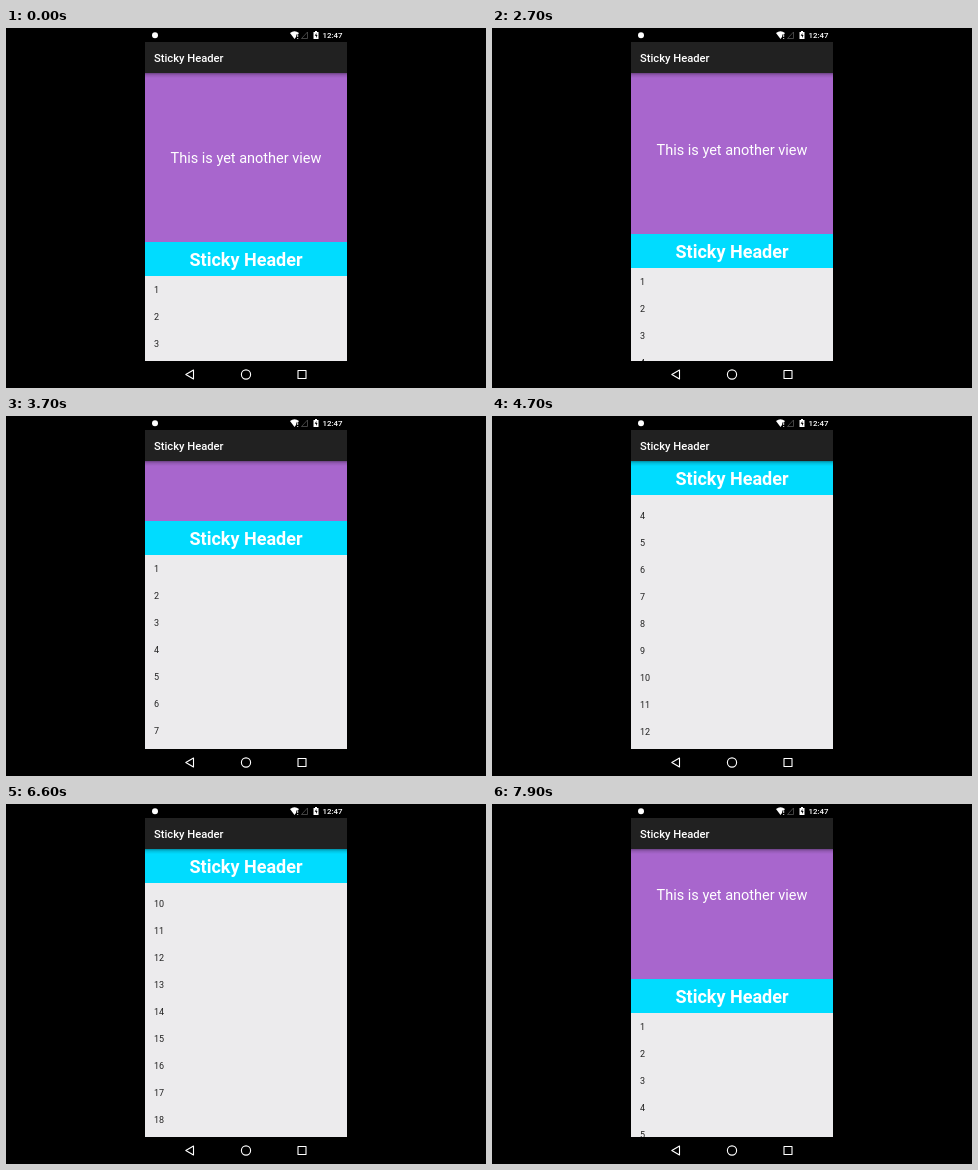
Animation, 480 px wide and 360 px high, one loop 8000 ms. Source, as an HTML page:

```html
<!DOCTYPE html>
<html lang="en">
<head>
<meta charset="utf-8">
<title>Sticky header</title>
<style>
  html, body { margin: 0; width: 100%; height: 100%; overflow: hidden; background: #000; }
  svg { display: block; width: 480px; height: 360px; font-family: Roboto, sans-serif; }
  .mid { text-anchor: middle; fill: #fff; }
  .row { font-size: 9px; fill: #212121; }
</style>
</head>
<body>
<svg viewBox="0 0 480 360">
  <defs>
    <clipPath id="screen"><rect x="139" y="45" width="202" height="288"/></clipPath>
    <linearGradient id="shade" x1="0" y1="0" x2="0" y2="1">
      <stop offset="0" stop-color="#000" stop-opacity=".36"/>
      <stop offset=".4" stop-color="#000" stop-opacity=".13"/>
      <stop offset="1" stop-color="#000" stop-opacity="0"/>
    </linearGradient>
  </defs>
  <rect width="480" height="360"/>

  <g clip-path="url(#screen)">
    <rect x="139" y="45" width="202" height="288" fill="#ecebed"/>
    <g id="content">
      <rect x="139" y="45" width="202" height="169" fill="#a866cd"/>
      <text class="mid" x="240" y="135.3" font-size="14.5">This is yet another view</text>
      <g id="rows"></g>
    </g>
    <g id="header">
      <rect x="139" width="202" height="34" fill="#00dcff"/>
      <text class="mid" x="240" y="24" font-size="18" font-weight="700">Sticky Header</text>
    </g>
    <rect x="139" y="45" width="202" height="5" fill="url(#shade)"/>
  </g>

  <rect x="139" y="14" width="202" height="31" fill="#212121"/>
  <text x="148" y="34" font-size="11.2" font-weight="500" fill="#fff">Sticky Header</text>

  <!-- status bar -->
  <g fill="#fff">
    <circle cx="149" cy="7.2" r="3"/>
    <path d="M284 5Q288.500 1.500 293 5L288.500 11Z"/>
    <path d="M291.500 6.500V9M291.500 10V11" stroke="#000" stroke-width="2.400"/>
    <path d="M291.700 6.500V9M291.700 10V11" stroke="#fff" stroke-width=".9"/>
    <path d="M295.500 10.500L301.500 4V10.500Z" fill="none" stroke="#555" stroke-width=".8"/>
    <path d="M307.500 4H309V3H311V4H312.500V11H307.500Z"/>
    <path d="M310.400 5L308.700 7.800H310V10L311.500 7H310.400Z" fill="#000"/>
    <text x="316.500" y="10" font-size="7.9" font-weight="500">12:47</text>
  </g>

  <!-- navigation bar -->
  <g fill="none" stroke="#fff" stroke-width="1.100" stroke-linejoin="round">
    <path d="M179.800 346.500L187.500 342V351Z"/>
    <circle cx="240" cy="346.500" r="4.600"/>
    <rect x="292" y="342.500" width="8" height="8"/>
  </g>
</svg>
<script>
  const LOOP = 8000, STEP = 100, ROW = 27, STUCK = 45, REST = 214;
  const byId = id => document.getElementById(id);
  const content = byId('content'), header = byId('header');

  // time in ms, scroll in px, speed in px per second
  const keys = [
    [2600, 0, 0], [2700, 8, 90], [3700, 109, 115], [4700, 243, 200],
    [5900, 567, 0], [7300, 161, -235], [7900, 39, -180]
  ];

  for (let n = 1; n <= 30; n++) {
    const row = document.createElementNS('http://www.w3.org/2000/svg', 'text');
    row.setAttribute('class', 'row');
    row.setAttribute('x', 148);
    row.setAttribute('y', 265.2 + (n - 1) * ROW);
    row.textContent = n;
    byId('rows').append(row);
  }

  function scrollAt(t) {
    if (t <= keys[0][0]) return 0;
    const i = keys.findIndex(k => t <= k[0]);
    if (i < 0) return keys[keys.length - 1][1];
    const [t0, a, va] = keys[i - 1], [t1, b, vb] = keys[i];
    const d = (t1 - t0) / 1000, u = (t - t0) / (t1 - t0), w = 1 - u;
    return a * w * w * (1 + 2 * u) + b * u * u * (3 - 2 * u)
      + d * u * w * (va * w - vb * u);
  }

  function draw(t) {
    const s = Math.round(scrollAt(Math.floor(t / STEP) * STEP));
    content.setAttribute('transform', `translate(0 ${-s})`);
    header.setAttribute('transform', `translate(0 ${Math.max(STUCK, REST - s)})`);
  }

  const start = performance.now();
  function tick() {
    draw((performance.now() - start) % LOOP);
    requestAnimationFrame(tick);
  }
  tick();
</script>
</body>
</html>
```
